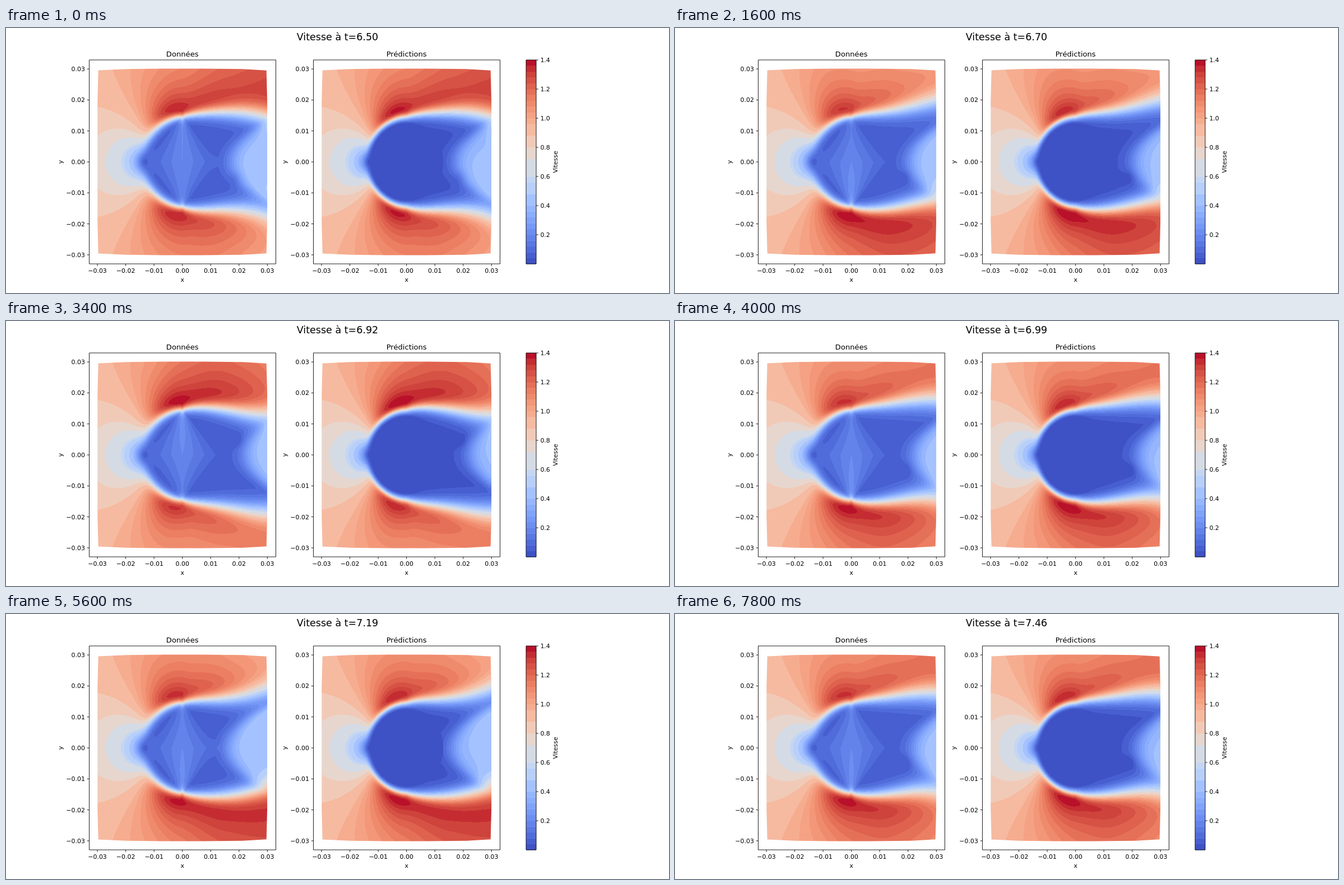
Animation of 1183 by 473 pixels, one loop 8 s. Source, as an HTML page with a canvas:

```html
<!DOCTYPE html>
<html lang="fr">
<head>
<meta charset="utf-8">
<title>Vitesse</title>
<style>
html, body { margin: 0; width: 100%; height: 100%; overflow: hidden; background: #fff; }
canvas, svg { position: absolute; left: 0; top: 0; width: 1183px; height: 473px; }
text { font-family: "DejaVu Sans", sans-serif; font-size: 10.95px; fill: #000; }
.line { fill: none; stroke: #000; stroke-width: 0.88; }
</style>
</head>
<body>
<canvas id="flow" width="1183" height="473"></canvas>
<svg id="axes" viewBox="0 0 1183 473"></svg>
<script>
const STEP = 200, STEPS = 40, PERIOD = 6.36;
const TAU = Math.PI * 2;
const SX = 50.55, SY = 55.3, CY = 239;
const PANELS = [{ cx: 314.7, title: "Données", mesh: true }, { cx: 714.7, title: "Prédictions", mesh: false }];
const BOX = { x: -153, y: 72, w: 306, h: 335 };

// Diverging blue-red colour scale
const STOPS = [
  [59, 76, 192], [77, 104, 215], [98, 130, 234], [119, 154, 247], [141, 176, 254], [163, 194, 255],
  [184, 208, 249], [204, 217, 238], [221, 221, 221], [236, 211, 197], [245, 196, 173], [247, 177, 148],
  [244, 154, 123], [236, 127, 99], [222, 96, 77], [203, 62, 56], [180, 4, 38]
];
const BANDS = 35, BAND = 0.04;
const WIDE = [[10, 11], [12, 13], [15, 17], [18, 19], [20, 21], [22, 23]];

function colour(u) {
  const p = Math.min(u, 0.9999) * (STOPS.length - 1), i = Math.floor(p);
  return STOPS[i].map((c, k) => Math.round(c + (STOPS[i + 1][k] - c) * (p - i)));
}

const palette = Array.from({ length: BANDS }, (_, i) => {
  const [lo, hi] = WIDE.find(w => i >= w[0] && i <= w[1]) || [i, i];
  return colour((lo + hi + 1) / 2 / BANDS);
});

const clamp = (v, lo, hi) => Math.max(lo, Math.min(hi, v));
const smooth = (a, b, v) => { const u = clamp((v - a) / (b - a), 0, 1); return u * u * (3 - 2 * u); };
const wave = p => Math.cos(TAU * p);
const logistic = v => 1 / (1 + Math.exp(-v));

// Slow flow inside the cylinder and its wake
function wake(X, Y, r, phase, mesh) {
  const base = mesh ? 0.05 : 0.02;
  const edge = 1.78 + 0.32 * wave(2 * (phase - 0.17)) + 0.8 * Y * Y;
  let v = base + 0.4 * logistic((X - edge - 0.15) / 0.2);
  v -= 0.04 * Y * wave(phase) * smooth(1.5, 2.8, X);
  const turn = wave(phase - 0.14), vy = turn > 0 ? -0.5 : 0.5;
  v -= 0.08 * Math.abs(turn) * Math.exp(-((X - 1.88) ** 2 + (Y - vy) ** 2) / 0.05);
  v = Math.max(v, base);
  if (mesh) {
    const fan = 1 - Math.abs(X) / Math.max(0.1, 1.45 - Math.abs(Y));
    if (fan > 0) v += fan * (0.15 - 0.04 * Y * wave(phase - 0.27));
  } else if (r < 1.3) {
    v = Math.min(v, base);
  }
  return v;
}

// Speed at a point; the lower half runs half a period behind the upper one
function speed(X, Y, phase, mesh) {
  const y = Math.abs(Y), r = Math.hypot(X, Y), down = Math.max(X, 0);
  const side = Y >= 0 ? phase : phase + 0.5;
  let border, depth, dist;
  if (X < 0) {
    const front = Math.min(1, -X / 1.3);
    border = 1.47 - 0.07 * front;
    depth = 0.07 + (mesh ? 0.03 : -0.02) * front;
    dist = r;
  } else {
    border = 1.47 + 0.14 * (1 - Math.exp(-X / 0.5)) + 0.045 * X * X * wave(side - 0.2 - 0.08 * (X - 1.7));
    depth = 0.07 + 0.05 * X;
    dist = y;
  }
  let mix = logistic((dist - border) / depth);
  if (!mesh) mix *= smooth(1.2, 1.34, r);

  const a2 = 1.69, xe = X < 0 ? X : X * 0.25;
  const r2 = Math.max(1, xe * xe + y * y + 0.6 * smooth(-1, 0.5, X));
  const ideal = Math.sqrt(1 - 2 * a2 * (xe * xe - y * y) / (r2 * r2) + (a2 / r2) ** 2);
  const gust = smooth(-1.2, 0.4, X) * (0.055 + 0.026 * down) * wave(side - 0.75 - 0.06 * down);
  const outer = (0.935 + 0.065 * smooth(-1, 1.5, X)) * ideal + gust;
  const inner = wake(X, Y, r, phase, mesh);
  return inner + (outer - inner) * mix;
}

const ctx = document.getElementById("flow").getContext("2d");
const tile = document.createElement("canvas");
tile.width = BOX.w;
tile.height = BOX.h;
const tctx = tile.getContext("2d");
const image = tctx.createImageData(BOX.w, BOX.h);

function outline(cx) {
  ctx.beginPath();
  const half = [[-150, 75.5], [-100, 73.2], [-35, 72.5], [35, 72.5], [107, 73.2], [150, 75.8], [151.4, 130]];
  for (const [x, y] of half) ctx.lineTo(cx + x, y);
  for (const [x, y] of half.slice().reverse()) ctx.lineTo(cx + x, 478 - y);
  ctx.lineTo(cx - 151.4, 348);
  ctx.lineTo(cx - 151.4, 130);
  ctx.closePath();
}

function drawPanel({ cx, mesh }, phase) {
  const data = image.data, left = Math.round(cx + BOX.x);
  let n = 0;
  for (let j = 0; j < BOX.h; j++) {
    const Y = (CY - BOX.y - j - 0.5) / SY;
    for (let i = 0; i < BOX.w; i++) {
      const X = (left + i + 0.5 - cx) / SX;
      const band = clamp(Math.floor(speed(X, Y, phase, mesh) / BAND), 0, BANDS - 1);
      const c = palette[band];
      data[n++] = c[0];
      data[n++] = c[1];
      data[n++] = c[2];
      data[n++] = 255;
    }
  }
  tctx.putImageData(image, 0, 0);
  ctx.save();
  outline(cx);
  ctx.clip();
  ctx.drawImage(tile, left, BOX.y);
  ctx.restore();
}

const svg = document.getElementById("axes");

function add(tag, attrs, content) {
  const el = document.createElementNS("http://www.w3.org/2000/svg", tag);
  for (const k in attrs) el.setAttribute(k, attrs[k]);
  if (content) el.textContent = content;
  svg.appendChild(el);
  return el;
}

const label = (x, y, str, anchor = "middle", size = 10.95) =>
  add("text", { x, y, "text-anchor": anchor, style: `font-size:${size}px` }, str);
const upright = (x, y, str) =>
  add("text", { "text-anchor": "middle", transform: `translate(${x} ${y}) rotate(-90)` }, str);
const line = d => add("path", { d, class: "line" });
const number = k => (k < 0 ? "\u2212" : "") + (Math.abs(k) / 100).toFixed(2);

function drawAxes({ cx, title }) {
  const left = cx - 166.2, right = cx + 166.8;
  line(`M${left} 57H${right}V421H${left}Z`);
  for (let k = -3; k <= 3; k++) {
    const x = cx + k * SX, y = CY - k * SY;
    line(`M${x} 421v3.8M${left} ${y}h-3.8`);
    label(x, 437.3, number(k));
    label(left - 7.6, y + 4, number(k), "end");
  }
  label(cx, 50.5, title, "middle", 13.14);
  label(cx, 452.5, "x");
  upright(cx - 214, CY, "y");
}

function drawScale() {
  const h = 364 / BANDS;
  palette.forEach((c, i) =>
    add("rect", { x: 928, y: 421 - (i + 1) * h, width: 18, height: h + 0.4, fill: `rgb(${c})` }));
  line("M928 57H946V421H928Z");
  for (let k = 1; k <= 7; k++) {
    const y = 421 - k * 52;
    line(`M946 ${y}h3.8`);
    label(953.4, y + 4, (k / 5).toFixed(1), "start");
  }
  upright(983.5, CY, "Vitesse");
}

PANELS.forEach(drawAxes);
drawScale();
const heading = label(591.5, 22, "", "middle", 17.52);

let shown = -1;
function render(now) {
  const step = Math.floor(now / STEP) % STEPS;
  if (step !== shown) {
    shown = step;
    ctx.clearRect(0, 0, 1183, 473);
    for (const p of PANELS) drawPanel(p, step / PERIOD);
    heading.textContent = "Vitesse à t=" + (6.5 + step * 0.0246).toFixed(2);
  }
}

const start = performance.now();
function tick() {
  render(performance.now() - start);
  requestAnimationFrame(tick);
}
tick();
</script>
</body>
</html>
```
